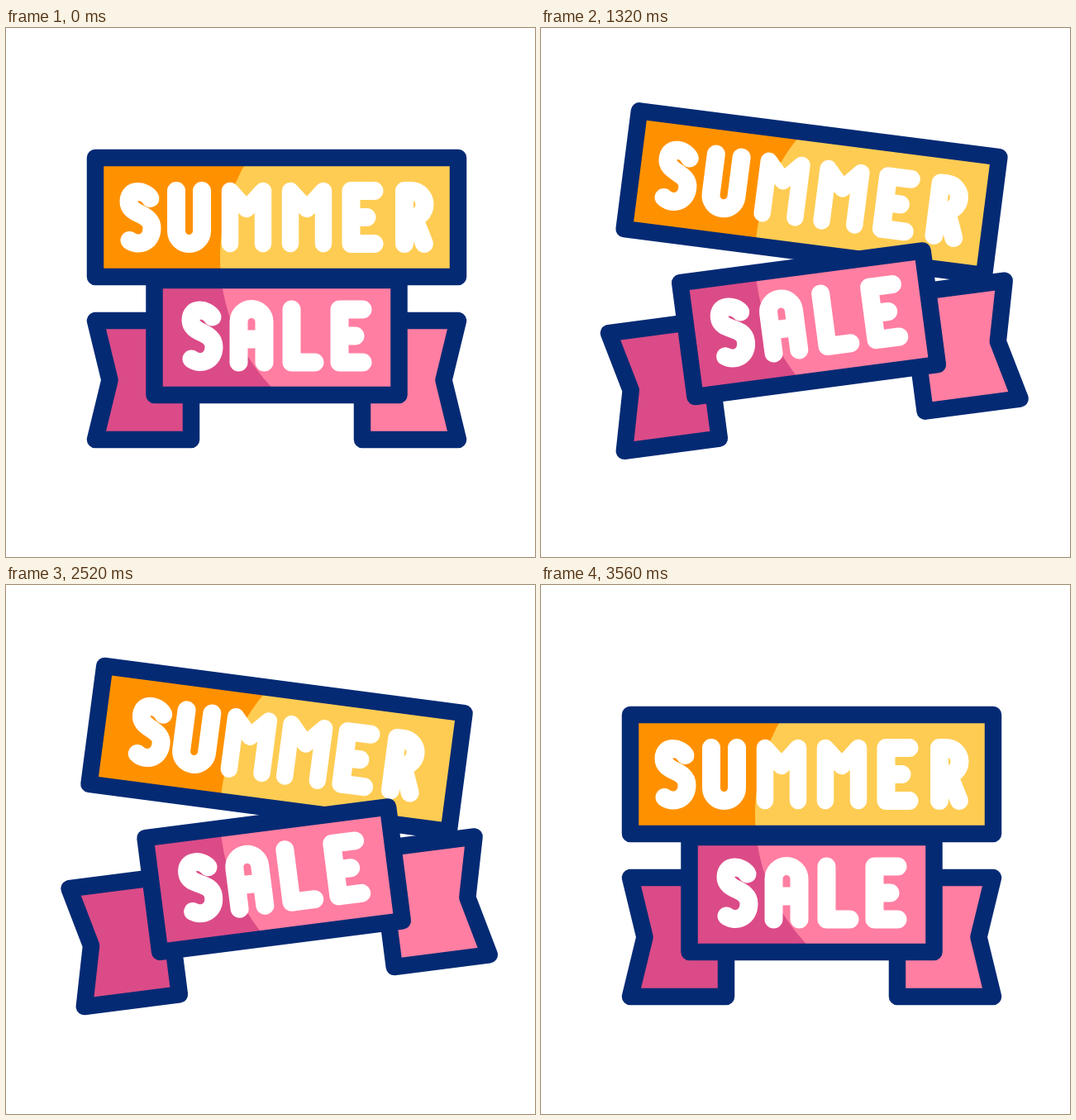
An HTML page with a canvas for the animation above (3600 ms loop, 640 by 640 pixels).

```html
<!DOCTYPE html>
<html lang="en">
<head>
<meta charset="utf-8">
<title>Summer sale</title>
<style>
  html, body { margin: 0; width: 100%; height: 100%; overflow: hidden; background: #fff; }
  canvas { display: block; width: 640px; height: 640px; }
</style>
</head>
<body>
<canvas id="stage" role="img" aria-label="SUMMER SALE"></canvas>
<script>
const LOOP = 3600;
const NAVY = '#042a74', TEAL = '#65cdd1';
const GOLD = ['#fecc53', '#ff9100'], PINK = ['#ff7ea1', '#db4b87'];
const SUMMER_AT = [327.5, 229], SALE_AT = [327.5, 401];

const canvas = document.getElementById('stage');
const ctx = canvas.getContext('2d');
const dpr = window.devicePixelRatio || 1;
canvas.width = canvas.height = 640 * dpr;

// Each row: time, then the values at that time.
const summerKeys = [
  // angle, dy
  [0, 0, 0], [400, -4, 16], [420, -3.9, 15.8], [540, .6, -4], [660, 6.2, -26],
  [960, 6.85, -29], [1780, 7.6, -29.6], [2520, 7.5, -31], [2700, 7.2, -29],
  [2820, 4.8, -18], [3100, -3, 16.4], [3160, -3.7, 17], [3240, -2.9, 12.5],
  [3550, 0, 0], [LOOP, 0, 0]
];
const saleKeys = [
  // angle, dy, tail slide
  [0, 0, 0, 0], [280, 3.8, 15, -18], [420, -.6, 2.5, -6], [540, -6.8, -15, 19],
  [960, -7.2, -17, 20.5], [1780, -7.8, -17, 24], [2520, -7.3, -18.5, 27.5],
  [2700, -5, -11, 13.5], [2990, 3.8, 16, -20], [3100, 2.8, 11.5, -17],
  [3240, 1.3, 6, -7], [3460, 0, 0, 0], [LOOP, 0, 0, 0]
];
const summerSpread = [[0, 1], [520, 1], [940, .93], [1770, 1.073], [2530, .93], [2900, 1], [LOOP, 1]];
const saleSpread = [[0, 1], [440, 1], [900, .875], [1750, 1.18], [2520, .99], [2760, 1], [LOOP, 1]];
const rayTip = [[0, 522], [370, 522], [420, 544], [510, 572], [LOOP, 572]];
const rayTail = [[0, 522], [440, 522], [620, 572], [LOOP, 572]];

// Monotone cubic through the rows, flat at every extreme.
function sample(keys, t) {
  let i = 0;
  while (i < keys.length - 2 && t >= keys[i + 1][0]) i++;
  const a = keys[i], b = keys[i + 1], h = b[0] - a[0], u = (t - a[0]) / h;
  const slope = (j, k) => keys[j] && keys[j + 1]
    ? (keys[j + 1][k] - keys[j][k]) / (keys[j + 1][0] - keys[j][0]) : 0;
  const tangent = (j, k) => {
    const p = slope(j - 1, k), q = slope(j, k);
    return p * q > 0 ? 2 * p * q / (p + q) : 0;
  };
  return a.slice(1).map((v, n) => {
    const k = n + 1, w = 1 - u;
    return v * w * w * (1 + 2 * u) + b[k] * u * u * (3 - 2 * u)
      + h * u * w * (tangent(i, k) * w - tangent(i + 1, k) * u);
  });
}

const glyphs = {
  S: 'M12-23C6-32.5-14-36-14-19C-14-2 14-6 14 13C14 32-4 35-13 28',
  U: 'M-15.5-32V16.5a15.5 15.5 0 0 0 31 0V-32',
  M: 'M-20 32V-32L0-10L20-32V32',
  E: 'M14-32H-14V32H14M-14 0H5',
  R: 'M-12 32V-32H-4a16 16 0 0 1 0 33H-12M0 2L12 32',
  A: 'M-15.5 32V-17a15.5 15.5 0 0 1 31 0V32M-15 4H15',
  L: 'M-14-32V32H14'
};
for (const g in glyphs) glyphs[g] = new Path2D(glyphs[g]);

const summerBox = new Path2D('M-219.5-72H219.5V72H-219.5Z');
const saleBox = new Path2D('M-148-96H148V43H-148Z');
const leftTail = new Path2D('M-219.5-47H-103.5V97H-219.5L-202 25Z');
const rightTail = new Path2D('M219.5-47H103.5V97H219.5L202 25Z');

const home = () => ctx.setTransform(dpr, 0, 0, dpr, 0, 0);

function place([x, y], angle, dy, slide = 0) {
  home();
  ctx.translate(x, y + dy);
  ctx.rotate(angle * Math.PI / 180);
  ctx.translate(slide, 0);
}

// The light disc stays fixed on the stage while panels move over it.
function panel(path, [light, dark], ...pose) {
  ctx.save();
  place(...pose);
  ctx.fillStyle = dark;
  ctx.fill(path);
  ctx.clip(path);
  home();
  ctx.fillStyle = light;
  ctx.beginPath();
  ctx.arc(487, 278, 228, 0, 7);
  ctx.fill();
  ctx.restore();
  place(...pose);
  ctx.strokeStyle = NAVY;
  ctx.lineWidth = 20.5;
  ctx.stroke(path);
}

function word(text, offsets, y, spread) {
  ctx.strokeStyle = '#fff';
  [...text].forEach((ch, i) => {
    ctx.save();
    ctx.translate(offsets[i] * spread, y);
    ctx.lineWidth = ch === 'M' ? 20.5 : 22;
    ctx.stroke(glyphs[ch]);
    ctx.restore();
  });
}

function ray(t) {
  const [tip] = sample(rayTip, t), [tail] = sample(rayTail, t);
  if (tip - tail < .5) return;
  ctx.strokeStyle = TEAL;
  ctx.lineWidth = 20.5;
  ctx.beginPath();
  ctx.moveTo(314, tail);
  ctx.lineTo(314, tip);
  ctx.stroke();
}

function draw(t) {
  home();
  ctx.fillStyle = '#fff';
  ctx.fillRect(0, 0, 640, 640);
  ctx.lineCap = ctx.lineJoin = 'round';
  ray(t);

  const [a, y] = sample(summerKeys, t);
  panel(summerBox, GOLD, SUMMER_AT, a, y);
  word('SUMMER', [-165, -106, -36.5, 36.5, 104, 166.5], 0, sample(summerSpread, t)[0]);

  const [b, dy, slide] = sample(saleKeys, t);
  panel(leftTail, PINK, SALE_AT, b, dy, -slide);
  panel(rightTail, PINK, SALE_AT, b, dy, slide);
  panel(saleBox, PINK, SALE_AT, b, dy);
  word('SALE', [-90, -30.5, 32, 90], -28.5, sample(saleSpread, t)[0]);
}

function tick() {
  draw(performance.now() % LOOP);
  requestAnimationFrame(tick);
}
tick();
</script>
</body>
</html>
```
